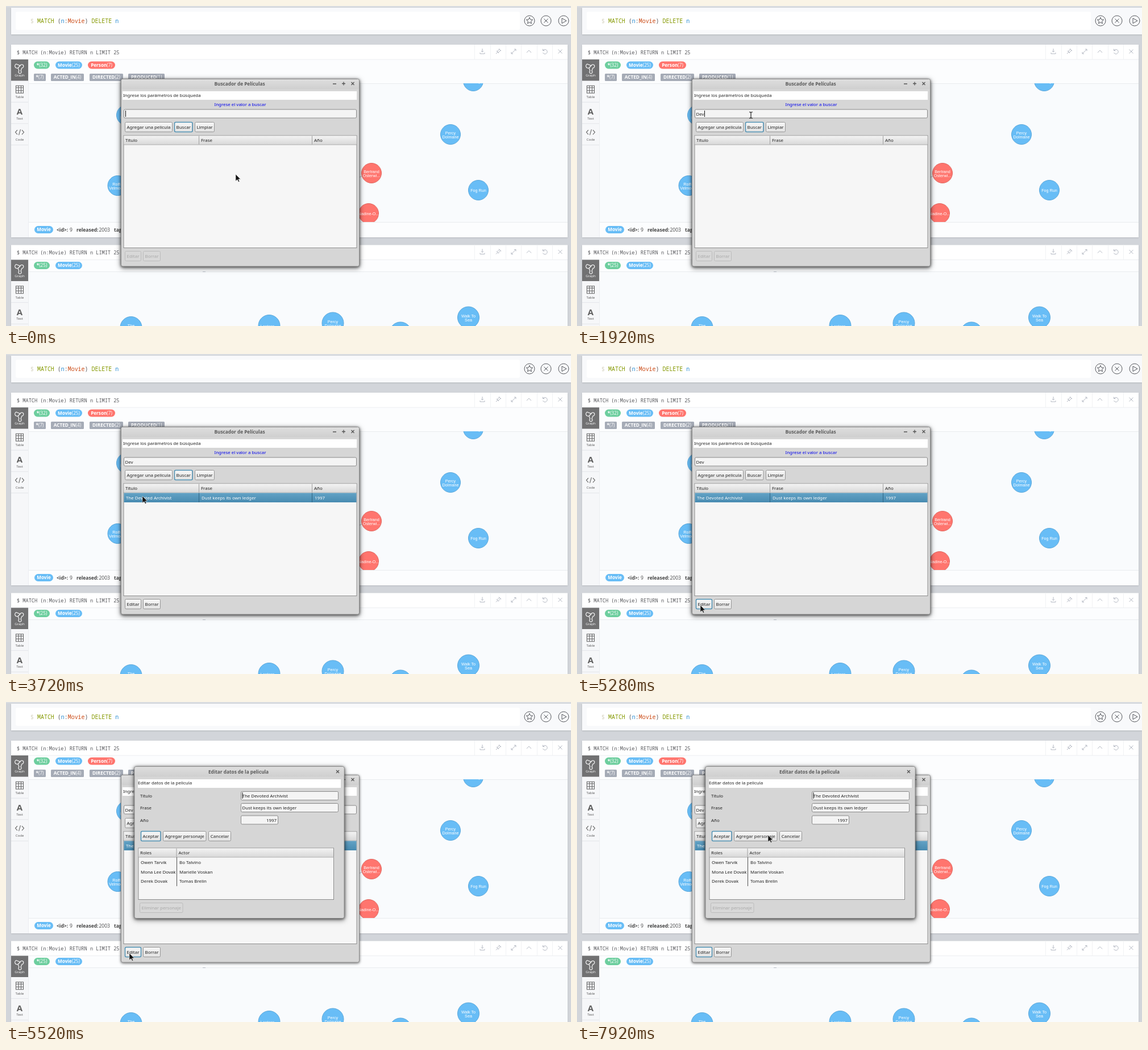
Write an HTML page that moves like this. It is 994x563 px and loops after 8 s.

```html
<!DOCTYPE html>
<html lang="es">
<head>
<meta charset="utf-8">
<title>Buscador de Películas</title>
<style>
html, body { margin: 0; width: 100%; height: 100%; overflow: hidden; background: #d2d5da; }
svg { display: block; width: 994px; height: 563px; }
text { font: 7.92px "Noto Sans", sans-serif; fill: #222; white-space: pre; }
.mid { text-anchor: middle; }
.end { text-anchor: end; }
.title { font-weight: 700; font-size: 8.26px; fill: #5a5a5a; }
.mono { font: 8.6px "Noto Sans Mono", monospace; fill: #58595d; }
.query { font-size: 9.95px; }
.chip { font: 8.2px "Open Sans", sans-serif; fill: #fff; }
.info { font: 8.5px "Open Sans", sans-serif; fill: #444; }
.tab { font: 6.1px "Open Sans", sans-serif; fill: #555; }
.node { font: 7.2px "Liberation Sans", sans-serif; fill: #fff; text-anchor: middle; }
.b { font-weight: 700; }
.line { fill: none; stroke: #b4b9c3; }
.off { fill: #a9a9a9; }

.shadow { filter: drop-shadow(0 1px 2px rgba(0,0,0,.55)) drop-shadow(0 2px 4px rgba(0,0,0,.5)); }
.caret, .d, .e, .v, .found, .pick, .picked, .ready, .ready text, .blur, .focus-a, .focus-b, .dialog, .cursor, .arrow, .beam {
  animation: 8s step-end infinite;
}
.caret { animation-name: caret; }
.d { animation-name: d; }
.e { animation-name: e; }
.v { animation-name: v; }
.found { animation-name: found; }
.pick { animation-name: pick; }
.picked { animation-name: picked; }
.ready { animation-name: pick; }
.blur { animation-name: blur; }
.focus-a { animation-name: focusA; }
.focus-b { animation-name: focusB; }
.dialog { animation-name: dialog; }
.cursor { animation-name: move; }
.arrow { animation-name: arrow; }
.beam { animation-name: beam; }

@keyframes caret {
  0% { transform: none; opacity: 1 } 7.5% { opacity: 0 } 12% { opacity: 1 }
  18% { transform: translateX(6px) } 21% { transform: translateX(10px) } 24% { transform: translateX(14px) }
  30% { opacity: 0 } 36% { opacity: 1 } 43.5%, 100% { opacity: 0 }
  100% { transform: translateX(14px) }
}
@keyframes d { 0% { fill-opacity: 0 } 18%, 100% { fill-opacity: 1 } }
@keyframes e { 0% { fill-opacity: 0 } 21%, 100% { fill-opacity: 1 } }
@keyframes v { 0% { fill-opacity: 0 } 24%, 100% { fill-opacity: 1 } }
@keyframes found { 0% { opacity: 0 } 36%, 100% { opacity: 1 } }
@keyframes pick { 0% { opacity: 0 } 43.5%, 100% { opacity: 1 } }
@keyframes picked { 0% { fill: #222 } 43.5%, 100% { fill: #fff } }
@keyframes blur {
  0% { filter: drop-shadow(0 1px 2px rgba(0,0,0,.55)) drop-shadow(0 2px 4px rgba(0,0,0,.5)) }
  67.5%, 100% { filter: drop-shadow(0 1px 2px rgba(0,0,0,.35)) drop-shadow(0 1px 2px rgba(0,0,0,.3)) }
}
@keyframes focusA { 0% { opacity: 1 } 61.5%, 100% { opacity: 0 } }
@keyframes focusB { 0% { opacity: 0 } 61.5%, 100% { opacity: 1 } }
@keyframes dialog { 0% { visibility: hidden } 67.5%, 100% { visibility: visible } }
@keyframes arrow { 0% { opacity: 1 } 7.5% { opacity: 0 } 30%, 100% { opacity: 1 } }
@keyframes beam { 0% { opacity: 0 } 7.5% { opacity: 1 } 30%, 100% { opacity: 0 } }
@keyframes move {
  0% { transform: translate(404px,296px) }
  1.5% { transform: translate(350px,240px) }
  3% { transform: translate(314px,197px) }
  7.5% { transform: translate(308px,193px) }
  9% { transform: translate(306px,192px) }
  30% { transform: translate(320px,209px) }
  37.5% { transform: translate(300px,222px) }
  39% { transform: translate(268px,236px) }
  40.5% { transform: translate(250px,246px) }
  43.5% { transform: translate(246px,249px) }
  45% { transform: translate(242px,250px) }
  46.5% { transform: translate(240px,250px) }
  51% { transform: translate(236px,290px) }
  52.5% { transform: translate(222px,370px) }
  54% { transform: translate(213px,415px) }
  57% { transform: translate(214px,428px) }
  58.5% { transform: translate(216px,438px) }
  60% { transform: translate(217px,442px) }
  70.5% { transform: translate(240px,440px) }
  72% { transform: translate(330px,438px) }
  73.5% { transform: translate(470px,430px) }
  75% { transform: translate(585px,404px) }
  76.5% { transform: translate(619px,310px) }
  78% { transform: translate(590px,150px) }
  79.5% { transform: translate(450px,45px) }
  81% { transform: translate(270px,36px) }
  82.5% { transform: translate(169px,150px) }
  84% { transform: translate(244px,287px) }
  85.5% { transform: translate(330px,400px) }
  87% { transform: translate(460px,405px) }
  88.5% { transform: translate(550px,350px) }
  90% { transform: translate(567px,250px) }
  91.5% { transform: translate(500px,165px) }
  93% { transform: translate(380px,160px) }
  94.5% { transform: translate(302px,210px) }
  96% { transform: translate(384px,239px) }
  97.5% { transform: translate(360px,238px) }
  99%, 100% { transform: translate(336px,234px) }
}
</style>
</head>
<body>
<svg id="stage" viewBox="0 0 994 563"></svg>
<script>
const BLUE = '#68bdf6', RED = '#ff756e', GREEN = '#6dce9e', GREY = '#a5abb6';

const text = (x, y, s, cls = '') => `<text x="${x}" y="${y}" class="${cls}">${s}</text>`;
const rect = (x, y, x2, y2, fill, more = '') =>
  `<rect x="${x}" y="${y}" width="${x2 - x}" height="${y2 - y}" fill="${fill}" ${more}/>`;
const box = (x, y, x2, y2, fill, stroke, r = 0) =>
  rect(x + .5, y + .5, x2 - .5, y2 - .5, fill, `stroke="${stroke}" rx="${r}"`);
const path = (d, more = 'class="line"') => `<path d="${d}" ${more}/>`;

// Query browser behind the windows
const chip = (x, x2, y, name, count, color, r = 6.5) =>
  rect(x, y, x2, y + 13, color, `rx="${r}"`) +
  text((x + x2) / 2, y + 9.4, `<tspan class="b">${name}</tspan>${count}`, 'chip mid');

const node = (x, y, r, color, ...lines) =>
  `<circle cx="${x}" cy="${y}" r="${r}" fill="${color}" stroke="${color === RED ? '#e06760' : '#5ca8db'}"/>` +
  lines.map((s, i) => text(x, y + 3 + (i - (lines.length - 1) / 2) * 7, s, 'node')).join('');

const tools = [
  [838, 'M-4 2V4H4V2M0-5V1M-2-1L0 1 2-1'],
  [866, 'M-4 4L-1 1M-3-1L1 3M-2 0L2-4 4-2 0 2M1-5L5-1'],
  [893, 'M-4 4L4-4M1-4H4V-1M-4 1V4H-1'],
  [920, 'M-4 2L0-2 4 2'],
  [948, 'M-3-2A4 4 0 1 1-3.5 2M-3.5-4.5V-1.5H-.5'],
  [975, 'M-3.5-3.5L3.5 3.5M3.5-3.5L-3.5 3.5']
];

const tabIcons = [
  'M18-7A3.5 3.5 0 1 0 21 0L23 5A2.6 2.6 0 1 0 26 5L28 0A3 3 0 1 0 25-4ZM21 0L25-4',
  'M17.5-6.5H30.5V6.5H17.5ZM17.5-3H30.5M17.5 2H30.5M22-6.5V6.5M26.5-6.5V6.5',
  '',
  'M20-4L16.5 0 20 4M28-4L31.5 0 28 4M25.5-5L22.5 5'
];

function tabs(y, count) {
  return ['Graph', 'Table', 'Text', 'Code'].slice(0, count).map((name, i) => {
    const top = y + i * 37.7, on = i === 0;
    return (on ? rect(9, top, 39, top + 37.5, '#717172') : path(`M9 ${top + 37.5}H39`, 'stroke="#e3e5e9"')) +
      `<g transform="translate(0 ${top + 15})">` +
      path(tabIcons[i], `fill="none" stroke="${on ? '#fff' : '#666'}" stroke-width="1.1"`) + '</g>' +
      (i === 2 ? `<text x="24" y="${top + 22}" class="mid b" style="font-size:15px;fill:#606060">A</text>` : '') +
      `<text x="24" y="${top + 30.3}" class="tab mid" ${on ? 'style="fill:#fff"' : ''}>${name}</text>`;
  }).join('');
}

function panel(y, bottom, tabCount) {
  return rect(9, y, 988, bottom, '#fff', 'style="filter:drop-shadow(0 1px 1px rgba(0,0,0,.12))"') +
    rect(39, y + 26, 988, bottom, '#fcfdfe') +
    rect(9, y + 26, 39, bottom, '#f6f7f9') + path(`M39.5 ${y + 26}V${bottom}M9 ${y + 26}H988`, 'stroke="#eceef1"') +
    text(19, y + 16.5, '$ MATCH (n:Movie) RETURN n LIMIT 25', 'mono') +
    tools.map(([x, d]) => path(`M${x - 13.5} ${y}V${y + 26}`, 'stroke="#f1f2f4"') +
      `<g transform="translate(${x} ${y + 12})">${path(d)}</g>`).join('') +
    tabs(y + 26, tabCount);
}

const round = (x, d) => `<g transform="translate(${x} 26)" fill="none" stroke="#55575c">` +
  `<circle r="9"/>${path(d, 'stroke-linejoin="round"')}</g>`;

const star = 'M' + Array.from({ length: 10 }, (_, i) => {
  const a = i * Math.PI / 5, r = i % 2 ? 2.7 : 6;
  return `${(Math.sin(a) * r).toFixed(2)} ${(-Math.cos(a) * r).toFixed(2)}`;
}).join('L') + 'Z';

const browser =
  rect(0, 0, 994, 563, '#d2d5da') + rect(0, 0, 994, 2, '#dadde1') +
  rect(9, 3, 994, 50, '#f8f9fb', 'style="filter:drop-shadow(0 1px 1px rgba(0,0,0,.15))"') +
  rect(17, 10, 904, 42, '#fff', 'rx="3"') +
  `<text x="43" y="30" class="mono query" style="fill:#d9d6c6">$</text>
  <text x="55" y="30" class="mono query"><tspan fill="#859900">MATCH</tspan> (<tspan fill="#268bd2">n</tspan>:<tspan fill="#cb4b16">Movie</tspan>) <tspan fill="#859900">DELETE</tspan> <tspan fill="#268bd2">n</tspan></text>` +
  round(921, star) + round(950, 'M-3.5-3.5L3.5 3.5M3.5-3.5L-3.5 3.5') + round(981, 'M-3-4.5L5 0-3 4.5Z') +

  panel(68, 407, 4) +
  chip(49, 77, 97.5, '*', '(32)', GREEN) + chip(87, 134, 97.5, 'Movie', '(25)', BLUE) + chip(144, 192, 97.5, 'Person', '(7)', RED) +
  chip(49, 70, 119, '*', '(7)', GREY, 1.5) + chip(79, 137, 119, 'ACTED_IN', '(4)', GREY, 1.5) +
  chip(147, 206, 119, 'DIRECTED', '(2)', GREY, 1.5) + chip(215, 279, 119, 'PRODUCED', '(1)', GREY, 1.5) +
  rect(40, 136, 988, 380, '#f9fbfd') + path('M40 136.5H988M40 380.5H988', 'stroke="#e9ecef"') +
  '<clipPath id="graph"><path d="M40 136H988V380H40Z"/></clipPath><g clip-path="url(#graph)">' +
  path('M620 302L627 299') +
  node(822, 132, 17.5, BLUE, 'in a Day') + node(782, 226, 17.5, BLUE, 'Percy', 'Dolmane') +
  node(643, 294, 17.5, RED, 'Bertrand', 'Osterwi...') + node(831, 324, 17.5, BLUE, 'Fog Run') +
  node(638, 365, 17.5, RED, 'Nadine-O...') + node(212, 192, 17.5, BLUE, 'Quiet', 'Harbor') +
  node(196.5, 316, 17.5, BLUE, 'Rolfin', 'Velmodar') + '</g>' +
  chip(50, 83, 387, 'Movie', '', BLUE) +
  text(89, 397, '&lt;id&gt;:', 'info b') + text(112, 397, '9', 'info') +
  text(124, 397, 'released:', 'info b') + text(163.5, 397, '2003', 'info') + text(190, 397, 'tagline:', 'info b') +

  panel(420.5, 563, 3) +
  chip(49, 77, 450, '*', '(25)', GREEN) + chip(87, 134, 450, 'Movie', '(25)', BLUE) +
  rect(40, 467, 988, 563, '#f9fbfd') + path('M40 467.5H988', 'stroke="#e9ecef"') + path('M346 467.5H351') +
  node(220, 565.5, 19, BLUE, 'The', 'Orchard') + node(463, 562.5, 19, BLUE, 'Lantern...') +
  node(575, 558, 19, BLUE, 'Percy', 'Dolmane') + node(694, 575, 19, BLUE, '') +
  node(813.5, 548, 19, BLUE, 'Walk To', 'Sea');

// Desktop windows
const button = (x, x2, y, s, off) =>
  box(x, y, x2, y + 18, off ? '#d8d8d8' : 'url(#btn)', off ? '#bcbcbc' : '#969696', 2) +
  text((x + x2) / 2, y + 12, s, off ? 'mid off' : 'mid');
const ring = (x, x2, y, cls = '') =>
  rect(x + .5, y + .5, x2 - .5, y + 17.5, 'none', `rx="2" stroke="#5193b5" stroke-width="1.5" class="${cls}"`);
const entry = (x, x2, y) => box(x, y, x2, y + 16, '#f4f4f4', '#8a8a8a', 2);
const frame = (x, y, x2, y2, cls) =>
  rect(x, y, x2, y2, '#d6d6d6', `rx="3" stroke="#8c8c8c" class="${cls}"`) +
  rect(x + .5, y + .5, x2 - .5, y + 18, 'url(#bar)', 'rx="3"');
const table = (x, y, x2, y2, cols) =>
  box(x, y, x2, y2, '#f6f6f6', '#8e8e8e') + rect(x + 1, y + 1, x2 - 1, y + 16, 'url(#head)') +
  path(`M${x} ${y + 16.5}H${x2}`, 'stroke="#a5a5a5"') +
  cols.map(([at, s], i) => (i ? path(`M${at - 3.5} ${y + 1}V${y + 16}`, 'stroke="#a0a0a0"') : '') + text(at, y + 11.7, s)).join('');
const cross = (x, y) => path(`M${x - 2.5} ${y - 2.5}l5 5m0-5l-5 5`, 'stroke="#555" stroke-width="1.3"');

const film = 'The Devoted Archivist', tagline = 'Dust keeps its own ledger';

const search =
  frame(202.5, 128.5, 621.5, 458, 'blur') +
  text(411, 140, 'Buscador de Películas', 'title mid') +
  path('M575 137H581M591 136.5H597M594 133.5V139.5', 'stroke="#555" stroke-width="1.3"') + cross(610, 136.5) +
  rect(205, 150, 617, 165, '#fff') + text(206, 159.5, 'Ingrese los parámetros de búsqueda') +
  '<text x="412" y="176" class="mid" style="fill:#00e">Ingrese el valor a buscar</text>' +
  entry(207, 617, 181.5) +
  text(209.5, 192.5, '<tspan class="d">D</tspan><tspan class="e">e</tspan><tspan class="v">v</tspan>') +
  rect(210, 184, 211, 195, '#111', 'class="caret"') +
  button(209, 293, 204, 'Agregar una película') + button(296, 328.5, 204, 'Buscar') + button(332, 367, 204, 'Limpiar') +
  ring(296, 328.5, 204, 'focus-a') +
  table(206.5, 227.5, 617.5, 426, [[210, 'Título'], [343, 'Frase'], [542, 'Año']]) +
  '<g class="pick">' + rect(207.5, 244.5, 616.5, 261, 'url(#sel)') +
  path('M339.5 244.5V261M538.5 244.5V261', 'stroke="#2f6584"') + '</g>' +
  '<g class="found">' + text(211, 255.7, film, 'picked') + text(344, 255.7, tagline, 'picked') + text(543, 255.7, '1997', 'picked') + '</g>' +
  button(209, 238, 431, 'Editar', true) + button(241, 272, 431, 'Borrar', true) +
  '<g class="ready">' + button(209, 238, 431, 'Editar') + button(241, 272, 431, 'Borrar') + '</g>' +
  ring(209, 238, 431, 'focus-b');

const cast = [['Owen Tarvik', 'Bo Talvino'], ['Mona Lee Dovak', 'Marielle Voskan'], ['Derek Dovak', 'Tomas Brelin']];

const edit = '<g class="dialog">' +
  frame(226, 113.5, 595, 380.5, 'shadow') +
  text(409, 126, 'Editar datos de la pelicula', 'title mid') + cross(583.5, 122.5) +
  rect(232, 136, 589, 151, '#fff') + text(232, 145, 'Editar datos de la pelicula') +
  text(236, 168, 'Título') + text(236, 189, 'Frase') + text(236, 210.5, 'Año') +
  entry(413, 585, 157) + text(415.5, 168, film) + rect(415.5, 159, 416.5, 170, '#111') +
  entry(413, 585, 178) + text(415.5, 189, tagline) +
  entry(413, 479, 199.5) + text(476, 210.5, '1997', 'end') +
  button(237, 272.5, 227, 'Aceptar') + button(276, 352.5, 227, 'Agregar personaje') + button(356, 396, 227, 'Cancelar') +
  ring(237, 272.5, 227) +
  table(232.5, 256.5, 577, 348, [[236, 'Roles'], [303.5, 'Actor']]) +
  path('M300.5 273V324', 'stroke="#555"') +
  cast.map(([role, actor], i) => text(237, 285 + i * 16.5, role) + text(305, 285 + i * 16.5, actor)).join('') +
  button(235, 311.5, 353, 'Eliminar personaje', true) + '</g>';

const cursor = '<g class="cursor">' +
  path('M0 0V12L3 9.4 5 13.6 6.8 12.8 4.9 8.8H8.6Z', 'class="arrow" fill="#111" stroke="#eee" stroke-width=".6"') +
  path('M-3-5.5Q0-5.5 0-4Q0-5.5 3-5.5M0-4.5V4.5M-3 5.5Q0 5.5 0 4Q0 5.5 3 5.5', 'class="beam" fill="none" stroke="#222" stroke-width="1.2"') + '</g>';

const gradient = (id, a, b) =>
  `<linearGradient id="${id}" x2="0" y2="1"><stop stop-color="${a}"/><stop offset="1" stop-color="${b}"/></linearGradient>`;

document.getElementById('stage').innerHTML =
  '<defs>' + gradient('btn', '#f7f7f7', '#e2e2e2') + gradient('bar', '#dedede', '#cfcfcf') +
  gradient('head', '#f3f3f3', '#d9d9d9') + gradient('sel', '#62a2c5', '#488bb1') + '</defs>' +
  browser + search + edit + cursor;
</script>
</body>
</html>
```
